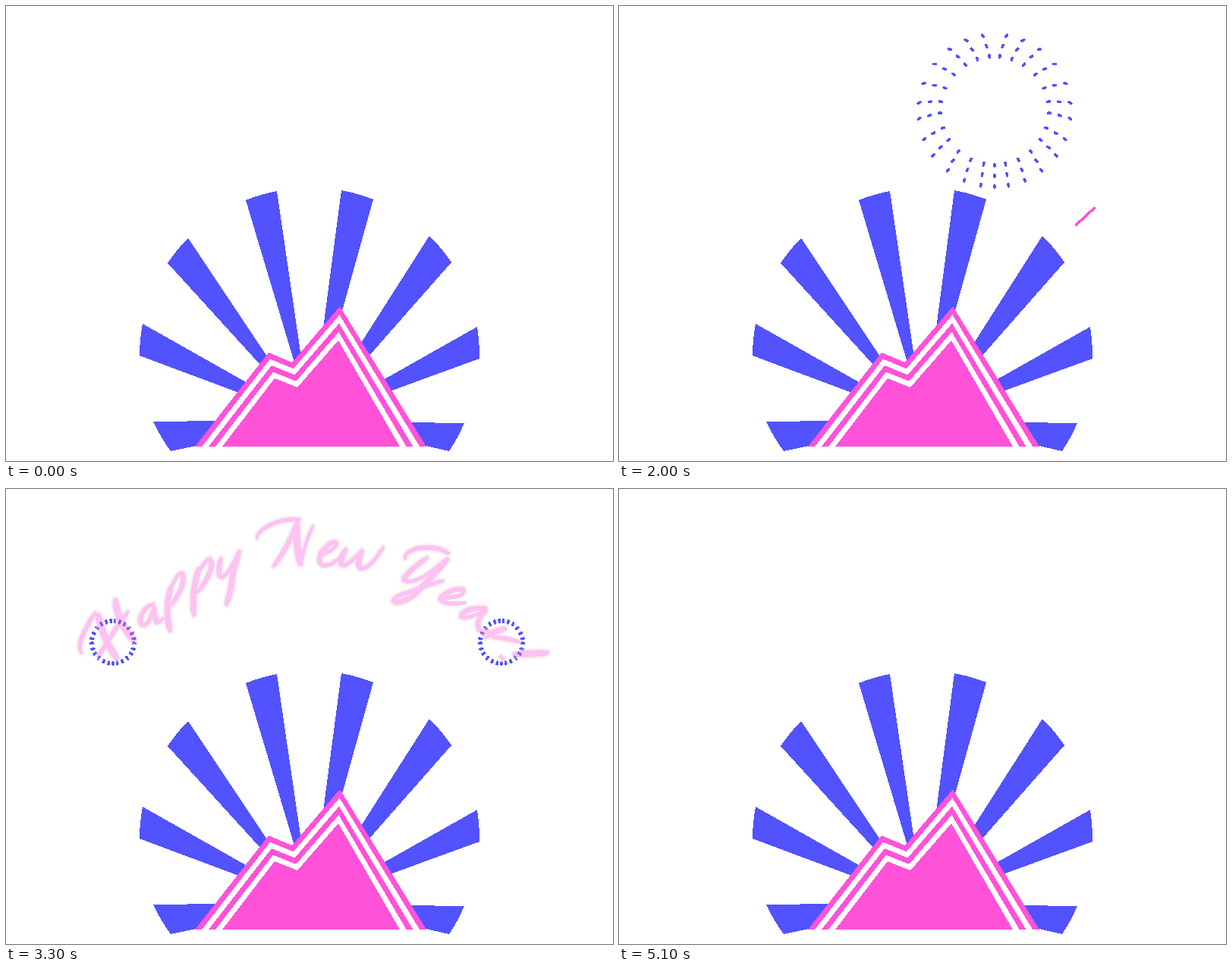
These frames come from a looping animation (800 px wide and 600 px high, 5300 ms). An HTML page:

```html
<!DOCTYPE html>
<html lang="en">
<head>
<meta charset="utf-8">
<title>Happy New Year!</title>
<style>
  html, body { margin: 0; width: 100%; height: 100%; overflow: hidden; background: #fff; }
  svg { display: block; width: 800px; height: 600px; }
  #scene, #sky { shape-rendering: crispEdges; }
  #greeting { stroke-linejoin: round; }
</style>
</head>
<body>
<svg viewBox="0 0 800 600">
  <g id="scene"></g>
  <g id="sky"></g>
  <g id="greeting" role="img" aria-label="Happy New Year!"></g>
</svg>
<script>
const PINK = '#ff52d9', BLUE = '#5252ff', GREY = '#e0e0e0';
const STEP = 100, STEPS = 53;
const byId = id => document.getElementById(id);
const path = (d, fill) => `<path d="${d}" fill="${fill}"/>`;

// Rays: two rim points, then two points hidden behind the mountain
const rays = [
  'M316 256A224 224 0 0 1 357 244L390 470L380 470Z',
  'M442 243A224 224 0 0 1 484 255L438 420L418 425Z',
  'M213 339A224 224 0 0 1 240 306L350 471L345 484Z',
  'M558 303A224 224 0 0 1 587 338L470 471L463 452Z',
  'M176 461A224 224 0 0 1 180 419L325 501L315 513Z',
  'M621 423A224 224 0 0 1 624 465L495 512L490 497Z',
  'M217 587A224 224 0 0 1 194 548L285 547L260 578Z',
  'M604 550A224 224 0 0 1 584 587L545 578L525 549Z'
];

// Mountain bands run from the outer outline to the core
const outline = [[249, 581], [346, 457], [377, 470], [440, 396], [554, 581]];
const core = [[285, 581], [354, 491], [384, 503], [438, 441], [519, 581]];
const band = (_, i) => {
  const pts = outline.map((p, n) => p.map((v, c) => v + (core[n][c] - v) * i / 4));
  return path('M' + pts.join('L') + 'Z', i % 2 ? '#fff' : PINK);
};
byId('scene').innerHTML = rays.map(d => path(d, BLUE)).join('') + Array.from({ length: 5 }, band).join('');

// Brush lettering: [width, pen path]
const strokes = [
  // Happy
  [7, 'M100 217Q94 208 101 194Q109 174 119 162'],
  [8, 'M121 164Q126 194 147 225'],
  [8, 'M144 144Q146 176 170 201'],
  [7, 'M121 222Q140 190 161 161'],
  [6, 'M196 151Q178 157 177 174Q180 186 189 173L196 154Q194 172 200 177L208 170'],
  [7, 'M218 127Q208 158 217 189'],
  [6, 'M217 132Q226 110 232 111Q239 122 218 154'],
  [7, 'M255 103Q244 134 248 168'],
  [6, 'M254 110Q265 90 270 93Q275 108 252 137'],
  [6, 'M284 90Q278 108 283 117Q292 116 308 81'],
  [7, 'M308 81Q298 106 297 130L290 154'],
  // New
  [6, 'M331 66Q329 57 349 47Q366 39 388 40'],
  [6, 'M385 42Q372 76 352 103'],
  [8, 'M384 43Q381 76 389 101'],
  [6, 'M388 101Q393 72 405 48'],
  [6, 'M413 88Q436 79 437 71Q430 66 416 83Q409 98 419 101Q429 101 441 89'],
  [7, 'M449 78Q438 95 443 101Q451 101 470 80'],
  [7, 'M470 80Q461 98 467 105Q480 104 491 86L498 76'],
  // Year!
  [7, 'M526 93Q523 84 543 78Q572 75 584 86'],
  [6, 'M556 90Q526 111 524 120Q532 126 553 114L583 91'],
  [7, 'M583 91Q556 122 536 141Q520 151 510 149Q508 143 528 137Q558 125 577 121'],
  [6, 'M573 144Q605 143 604 133Q588 129 572 144Q574 154 606 150'],
  [6, 'M634 157Q607 156 599 167Q603 175 634 159Q616 174 625 188L638 187'],
  [7, 'M660 184Q646 186 630 196'],
  [7, 'M641 196Q656 195 677 202'],
  [8, 'M715 216L668 218'],
  [8, 'M651 220L656 225']
];

// A ribbon along the pen path: fuller on downstrokes, narrower at both ends
function ribbon([width, d]) {
  const pen = document.createElementNS('http://www.w3.org/2000/svg', 'path');
  pen.setAttribute('d', d);
  const len = pen.getTotalLength(), n = Math.ceil(len / 3), left = [], right = [];
  for (let i = 0; i <= n; i++) {
    const s = len * i / n;
    const p = pen.getPointAtLength(s);
    const a = pen.getPointAtLength(Math.max(0, s - 1)), b = pen.getPointAtLength(Math.min(len, s + 1));
    const heading = Math.atan2(b.y - a.y, b.x - a.x);
    const lean = (p.x - 410) * 0.16 * Math.PI / 180;
    const taper = Math.min(1, 0.55 + Math.min(s, len - s) / 18);
    const half = width / 2 * taper * (0.85 + 0.2 * Math.sin(heading - lean));
    const ox = -Math.sin(heading) * half, oy = Math.cos(heading) * half;
    left.push([p.x + ox, p.y + oy]);
    right.unshift([p.x - ox, p.y - oy]);
  }
  return 'M' + [...left, ...right].join('L') + 'Z';
}
const lettering = strokes.map(ribbon).join('');
byId('greeting').innerHTML =
  `<path id="halo" d="${lettering}" fill="${GREY}" stroke="${GREY}"/>` +
  `<path d="${lettering}" fill="${PINK}" stroke="${PINK}"/>`;

// Spark directions, in degrees from straight up, mirrored to both sides
const angles = [9, 22, 36, 52, 69, 84, 96, 112, 126, 142, 156.5, 169.5];
const spokes = [...angles, 180, ...angles.map(a => -a)];

const rings = {
  6: [[28, 0]],
  7: [[42, 0], [58, 0.4]],
  8: [[72, 0], [86, 0.5], [100, 1]],
  9: [[100, 1]]
};

function burst(x, y, step) {
  let d = '';
  for (const [r, droop] of rings[step]) for (const spoke of spokes) {
    const side = Math.sign(spoke), a = Math.abs(spoke);
    const turn = a - Math.min(3.5, (180 - a) / 10) * (1 - droop);
    const tilt = a < 135 ? 45 * droop * Math.cos((a - 45) * Math.PI / 180) : 0;
    const pos = turn * Math.PI / 180, dir = (turn + tilt) * Math.PI / 180;
    const px = x + side * r * Math.sin(pos), py = y - r * Math.cos(pos);
    const ux = side * 1.5 * Math.sin(dir), uy = -1.5 * Math.cos(dir);
    d += `M${px - ux} ${py - uy}l${2 * ux} ${2 * uy}`;
  }
  return `<path d="${d}" stroke="${BLUE}" stroke-width="3.5" stroke-linecap="round"/>`;
}

function streak(x, y, dx, dy, near, far) {
  const len = Math.hypot(dx, dy), ux = dx / len, uy = dy / len;
  return `<path d="M${x + ux * near} ${y + uy * near}L${x + ux * far} ${y + uy * far}"
    stroke="${PINK}" stroke-width="3.5" stroke-linecap="round"/>`;
}

const ball = (x, y, r) => `<circle cx="${x}" cy="${y}" r="${r}" fill="${PINK}"/>`;
const tips = { left: 'l-11 -10l6 -5l2 2l4 -2l4 8Z', right: 'l7 -9l2 0l7 10l-9 1Z' };

function star(x, y) {
  const pts = Array.from({ length: 16 }, (_, i) => {
    const a = i * Math.PI / 8, r = i % 2 ? 11 : 20;
    return [x + r * Math.sin(a), y - r * Math.cos(a)];
  });
  return path('M' + pts.join('L') + 'Z', PINK);
}

// Burst centre, direction back to the launch, ball offset
const rockets = [
  { start: 1, x: 141, y: 242, dx: 77, dy: 71, bx: 10, by: 10 },
  { start: 7, x: 304, y: 141, dx: 9.5, dy: 33, bx: 4, by: 12 },
  { start: 13, x: 495, y: 138, dx: -9.5, dy: 33, bx: -4, by: 12 },
  { start: 19, x: 653, y: 242, dx: -77, dy: 71, bx: -10, by: 4 }
].map((r, i) => ({ ...r, tip: i < 2 ? tips.left : tips.right }));
for (const i of [0, 3]) rockets.push({ ...rockets[i], start: 28, lift: 40 });

function rocket(r, tick) {
  let step = tick - r.start + 1;
  if (r.lift && step > 8) step = tick < 50 ? 8 : tick - 41;
  const { x, y, dx, dy, bx, by } = r;
  if (step === 1) return streak(x, y, dx, dy, 70, 105);
  if (step === 2) return streak(x, y, dx, dy, 36, 69);
  if (step === 3) return ball(x + bx * 1.7, y + by * 1.7, 7);
  if (step === 4) return ball(x + bx, y + by, 9.8) + path(`M${x + bx} ${y + by}${r.tip}`, PINK);
  if (step === 5) return star(x, y);
  return rings[step] ? burst(x, y - (r.lift || 0), step) : '';
}

const fades = { 33: 0.35, 34: 0.7, 50: 0.72 };
const textAlpha = tick => fades[tick] ?? (tick >= 35 && tick < 50 ? 1 : 0);

let shown = -1;
function draw() {
  const tick = Math.floor(performance.now() / STEP) % STEPS;
  if (tick !== shown) {
    shown = tick;
    const alpha = textAlpha(tick);
    byId('sky').innerHTML = rockets.map(r => rocket(r, tick)).join('');
    byId('greeting').setAttribute('opacity', alpha);
    byId('halo').setAttribute('stroke-width', alpha < 1 ? 6 : 9);
  }
  requestAnimationFrame(draw);
}
draw();
</script>
</body>
</html>
```
